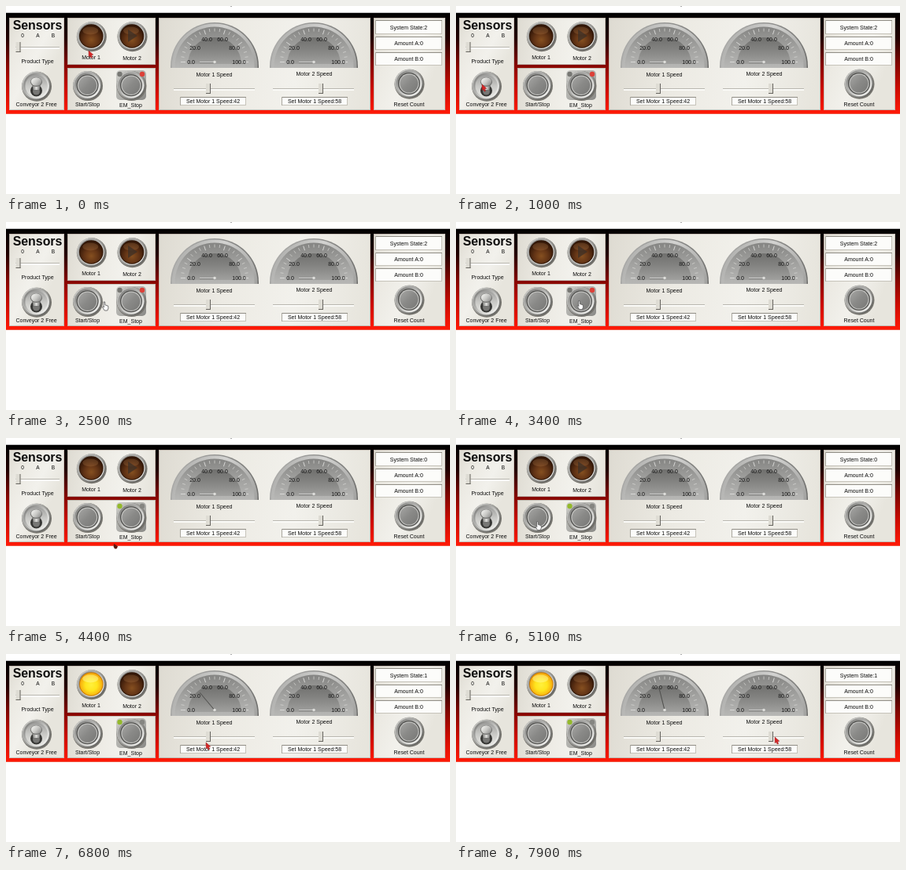
These frames come from a looping animation (564x240 px, 8 s). An HTML page with a canvas:

```html
<!DOCTYPE html>
<html lang="en">
<head>
<meta charset="utf-8">
<title>Conveyor control panel</title>
<style>
html, body { margin: 0; width: 564px; height: 240px; overflow: hidden; background: #fff; }
canvas { display: block; filter: blur(0.45px); }
</style>
</head>
<body>
<canvas id="stage" width="564" height="240"></canvas>
<script>
const ctx = document.getElementById('stage').getContext('2d');
const LOOP = 8000, STEP = 100;
const RELEASE = 3500, START = 5500;

// time, x, y of the pointer tip
const pointerPath = [
  [0, 105, 57], [300, 98, 63], [1000, 33, 100], [1500, 35, 101], [2200, 108, 101],
  [2500, 124, 102], [3000, 155, 99], [3700, 156, 102], [4100, 141, 138],
  [4400, 137, 135], [4700, 128, 129], [5200, 96, 101], [5900, 96, 101],
  [6800, 254, 113], [7200, 292, 109], [7900, 405, 106]
];
// time, needle angle in degrees from the left
const needlePath = [[5600, 0], [5700, 3], [6800, 50], [7400, 76]];

function sample(path, t, k) {
  if (t <= path[0][0]) return path[0][k];
  for (let i = 1; i < path.length; i++) {
    const a = path[i - 1], b = path[i];
    if (t <= b[0]) return a[k] + (b[k] - a[k]) * (t - a[0]) / (b[0] - a[0]);
  }
  return path[path.length - 1][k];
}

function withStops(g, colors) {
  colors.forEach((c, i) => g.addColorStop(i / (colors.length - 1), c));
  return g;
}

function linear(x0, y0, x1, y1, ...colors) {
  return withStops(ctx.createLinearGradient(x0, y0, x1, y1), colors);
}

function radial(x, y, r, ...colors) {
  return withStops(ctx.createRadialGradient(x, y, 0, x, y, r), colors);
}

function rect(x, y, w, h, fill) {
  ctx.fillStyle = fill;
  ctx.fillRect(x, y, w, h);
}

function oval(x, y, rx, ry, fill) {
  ctx.beginPath();
  ctx.ellipse(x, y, rx, ry, 0, 0, 7);
  ctx.fillStyle = fill;
  ctx.fill();
}

function disc(x, y, r, fill) {
  oval(x, y, r, r, fill);
}

function line(x0, y0, x1, y1, color, width = 1) {
  ctx.beginPath();
  ctx.moveTo(x0, y0);
  ctx.lineTo(x1, y1);
  ctx.strokeStyle = color;
  ctx.lineWidth = width;
  ctx.stroke();
}

function polygon(points, fill, stroke) {
  ctx.beginPath();
  points.forEach(([x, y]) => ctx.lineTo(x, y));
  ctx.closePath();
  ctx.fillStyle = fill;
  ctx.fill();
  if (stroke) {
    ctx.strokeStyle = stroke;
    ctx.lineWidth = 0.8;
    ctx.stroke();
  }
}

function label(s, x, y, font = '7px', color = '#0c0c0c') {
  ctx.font = font + ' "Liberation Sans", Arial, sans-serif';
  ctx.textAlign = 'center';
  ctx.fillStyle = color;
  ctx.fillText(s, x, y);
}

function panel(x, y, w, h) {
  rect(x, y, w, h, linear(x, y, x + w, y + h * 0.3, '#dedbd2', '#eceae3', '#f2f1ec', '#e7e5dd'));
  ctx.strokeStyle = 'rgba(110,90,80,.3)';
  ctx.lineWidth = 1;
  ctx.strokeRect(x + 0.5, y + 0.5, w - 1, h - 1);
}

function bezel(x, y) {
  disc(x + 0.5, y + 0.8, 19, '#77756f');
  disc(x, y, 18.3, linear(x - 14, y - 14, x + 14, y + 14, '#c9c9c6', '#9c9c99', '#62625f'));
  disc(x, y, 16.5, linear(x - 12, y - 12, x + 12, y + 12, '#858583', '#c4c4c1', '#ededea'));
}

function lamp(x, y, lit) {
  bezel(x, y);
  disc(x, y, 15.3, lit ? '#c87a05' : '#2e1607');
  disc(x, y, 14.3, lit
    ? radial(x, y + 1, 15, '#fff03c', '#ffe51e', '#f6a80c')
    : radial(x, y + 5, 17, '#865020', '#643516', '#351808'));
  oval(x - 1, y - 7, 10, 5, lit ? 'rgba(255,250,150,.5)' : 'rgba(180,125,75,.28)');
}

function pushButton(x, y, down) {
  bezel(x, y);
  disc(x, y, 14, '#4f4f4d');
  disc(x, y, 12.7, '#c2c2bf');
  disc(x, y, 11.5, down
    ? linear(x - 9, y - 9, x + 9, y + 9, '#6f6f6d', '#9c9c99', '#c0c0bc')
    : linear(x - 9, y - 9, x + 9, y + 9, '#a0a09e', '#898987', '#7c7c7a'));
}

function toggle(x, y) {
  bezel(x, y);
  disc(x, y, 14, linear(x, y - 14, x, y + 14, '#9d9d9b', '#c8c8c5', '#e6e6e2'));
  disc(x, y + 6, 7.5, '#363634');
  disc(x, y + 7, 4.5, '#777775');
  polygon([[x - 6, y - 6], [x + 6, y - 6], [x + 4, y + 5], [x - 4, y + 5]],
    linear(x - 6, y, x + 6, y, '#5f5f5d', '#dededb', '#555'));
  oval(x, y - 5, 7.5, 6, '#6d6d6b');
  oval(x, y - 5.5, 6.7, 5.2, linear(x - 6, y - 10, x + 6, y, '#f5f5f2', '#c8c8c5', '#858583'));
}

function gauge(x, degrees) {
  const dome = (r, fill) => {
    ctx.beginPath();
    ctx.arc(x, 77, r, Math.PI, 0);
    ctx.lineTo(x + r, 79);
    ctx.lineTo(x - r, 79);
    ctx.closePath();
    ctx.fillStyle = fill;
    ctx.fill();
  };
  dome(56, linear(x - 56, 21, x + 56, 79, '#b5b5b3', '#8e8e8c', '#6c6c6a'));
  dome(54.5, linear(x - 54, 24, x + 54, 79, '#a5a5a3', '#d2d2d0', '#a2a2a0'));
  dome(50.5, linear(x, 27, x, 79, '#858583', '#a1a19f', '#b7b7b5'));
  ctx.beginPath();
  ctx.arc(x, 74, 34, Math.PI, 0);
  ctx.fillStyle = linear(x, 40, x, 74, '#6f6f6d', '#858583', '#a0a09e');
  ctx.fill();

  const py = 71.5;
  for (let i = 0; i <= 20; i++) {
    const a = Math.PI * (1 + i / 20), c = Math.cos(a), s = Math.sin(a);
    const r = i % 4 ? 39 : 37;
    line(x + c * r, py + s * r, x + c * 43, py + s * 43, '#d8d8d6', i % 4 ? 0.7 : 1);
  }
  [['0.0', -30, 74], ['20.0', -25, 56], ['40.0', -10, 45],
   ['60.0', 10, 45], ['80.0', 25, 56], ['100.0', 31, 74]]
    .forEach(([s, dx, y]) => label(s, x + dx, y, '7px', '#181818'));

  const a = Math.PI + degrees * Math.PI / 180;
  const len = 19 + 10 * Math.min(1, degrees / 45);
  const tx = x + Math.cos(a) * len, ty = py + Math.sin(a) * len;
  line(x, py + 0.8, tx, ty + 0.8, '#6c6c6a', 0.7);
  line(x, py, tx, ty, degrees > 5 ? '#484846' : '#dededc', 0.8);
  disc(x, py, 1.8, '#dededb');
}

function slider(x0, x1, y, thumb) {
  rect(x0, y, x1 - x0, 1, '#b9b7b0');
  rect(x0, y + 1, x1 - x0, 2, '#fbfbf8');
  rect(thumb - 3, y - 6, 6, 13, '#dedcd4');
  rect(thumb + 2, y - 6, 1, 13, '#66645f');
  rect(thumb - 3, y + 6, 6, 1, '#66645f');
}

function field(s, x, y, w, h, base) {
  rect(x, y, w, h, '#c6c3ba');
  rect(x, y, w, 1, '#8f8c84');
  rect(x, y, 1, h, '#a9a69e');
  rect(x + 1, y + 1, w - 2, h - 2, '#fcfcfa');
  label(s, x + w / 2, base);
}

function pointer(x, y) {
  const inside = left => x >= left && x <= left + 50 && y >= 82 && y <= 121;
  const move = pts => pts.map(([px, py]) => [x + px, y + py]);
  if (inside(82) || inside(139)) {
    polygon(move([[0, 0], [1.6, 0], [2, 4], [5.6, 5], [6, 8], [4.8, 11], [1.2, 11],
      [-1.6, 6.5], [-0.6, 5.8], [0.4, 7]]), '#fff', '#555');
  } else if (y > 132) {
    polygon(move([[0, 0], [5, 3.2], [3.8, 6.2], [1.2, 6.6], [-0.4, 4]]), '#5b1a10');
  } else {
    polygon(move([[0, 0], [5.8, 5.2], [3.5, 5.7], [4.6, 8.6], [3, 9], [1.8, 6.4], [0.2, 7.8]]),
      '#d92424', 'rgba(150,35,35,.65)');
  }
}

function draw(t) {
  const started = t >= START, released = t >= RELEASE;
  rect(0, 0, 564, 240, '#fff');
  rect(0, 8, 564, 1, '#bcbcbe');
  rect(285, 0, 2, 1, '#aaa');
  rect(0, 9, 564, 128, linear(0, 9, 0, 137, '#000', '#220000', '#800600', '#cc0c00', '#ff1a08'));
  rect(0, 137, 564, 1, '#f0523f');

  panel(4, 15, 70, 118);
  panel(78, 15, 112, 60);
  panel(78, 79, 112, 54);
  panel(194, 15, 269, 118);
  panel(467, 15, 91, 118);

  label('Sensors', 40, 30, 'bold 15.9px', '#0c0c0c');
  ['0', 'A', 'B'].forEach((s, i) => label(s, 21 + i * 19.5, 40, '6.5px'));
  slider(12, 68, 52, 15.5);
  label('Product Type', 40, 73);
  toggle(38.5, 102);
  label('Conveyor 2 Free', 38.5, 128);

  lamp(108.3, 38.5, started);
  lamp(160, 38.5, false);
  if (t < 5400) polygon([[155, 30], [167, 38], [155, 46]], 'rgba(55,45,38,.7)');
  label('Motor 1', 108, 68);
  label('Motor 2', 160, 69);

  pushButton(103.5, 101.3, started && t < 5900);
  label('Start/Stop', 103.5, 128);
  ctx.beginPath();
  ctx.roundRect(140, 82, 38, 38, 5);
  ctx.fillStyle = linear(140, 82, 178, 120, '#cfcfcb', '#b0b0ac', '#898986');
  ctx.fill();
  pushButton(159, 101.3, false);
  disc(144.5, 87, 3.2, released ? '#94b92c' : '#777773');
  disc(173, 87, 3.2, released ? '#858581' : '#dc4038');
  label('EM_Stop', 158.5, 129);

  gauge(265, sample(needlePath, t, 1));
  gauge(391, 0);
  label('Motor 1 Speed', 264.5, 90);
  label('Motor 2 Speed', 391.5, 89);
  slider(213, 316, 105, 257);
  slider(339, 442, 105, 400);
  field('Set Motor 1 Speed:42', 221, 116, 84, 11, 124);
  field('Set Motor 1 Speed:58', 350, 116, 84, 11, 124);

  field('System State:' + (started ? 1 : released ? 0 : 2), 469, 18, 85, 18, 30);
  field('Amount A:0', 469, 39, 85, 17, 50);
  field('Amount B:0', 469, 59, 85, 17, 70);
  pushButton(512, 99, false);
  label('Reset Count', 512, 128);

  pointer(sample(pointerPath, t, 1), sample(pointerPath, t, 2));
}

const origin = performance.now();
function tick() {
  const t = (performance.now() - origin) % LOOP;
  draw(Math.floor(t / STEP) * STEP);
  requestAnimationFrame(tick);
}
tick();
</script>
</body>
</html>
```
